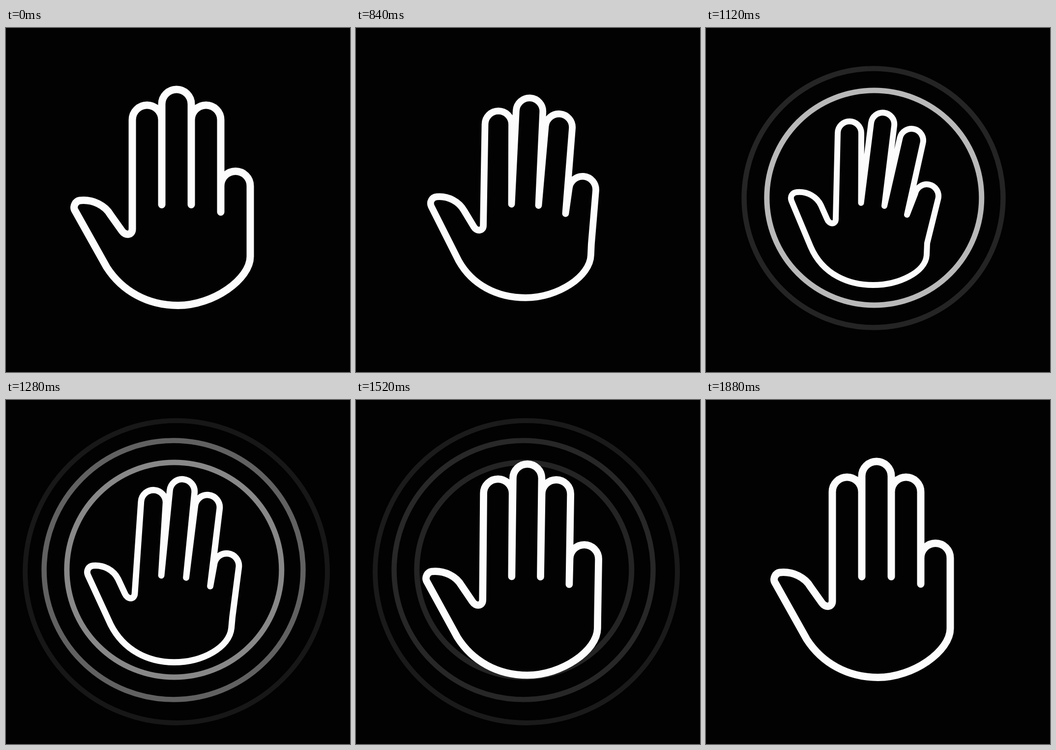
An HTML page without scripts that plays this animation: 700x700 px, repeating every 2.4 s.

```html
<!DOCTYPE html>
<html lang="en">
<head>
<meta charset="utf-8">
<title>Hand press</title>
<style>
  html, body { margin: 0; width: 100%; height: 100%; overflow: hidden; background: #020202; }
  svg { display: block; width: 100%; height: 100%; fill: none; stroke: #fcfcfc; }

  circle { opacity: 0; animation: 2.4s linear infinite; }
  .inner { stroke-width: 11; animation-name: inner; }
  .middle { stroke-width: 10.5; animation-name: middle; }
  .outer { stroke-width: 10; animation-name: outer; }

  @keyframes inner {
    0%, 40% { opacity: 0; }
    46.667% { opacity: .735; }
    48.333% { opacity: .75; }
    53.333% { opacity: .54; }
    63.333% { opacity: .135; }
    68.333%, 100% { opacity: 0; }
  }
  @keyframes middle {
    0%, 45% { opacity: 0; }
    46.667% { opacity: .135; }
    50% { opacity: .47; }
    53.333% { opacity: .385; }
    63.333% { opacity: .15; }
    70%, 100% { opacity: 0; }
  }
  @keyframes outer {
    0%, 51.667% { opacity: 0; }
    53.333% { opacity: .085; }
    56.667% { opacity: .19; }
    63.333% { opacity: .1; }
    70%, 100% { opacity: 0; }
  }

  /* One continuous line: little finger, palm, thumb, index, middle, ring.
     Arcs of radius 1 grow into half circles over their chord. */
  .hand {
    stroke-linejoin: round;
    stroke-linecap: round;
    animation: press 2.4s infinite;
  }
  @keyframes press {
    0%, 26.667%, 68.333%, 100% {
      stroke-width: 15px;
      animation-timing-function: cubic-bezier(.35, 0, .7, .49);
      d: path("M437 374.5 L437 321.5 A1 1 0 0 1 497 321.5 L497 440 L497 465 C497 511 422 564.5 350 564.5 C288 564.5 236 535 205 487 L139.5 370 C136.5 363 141 352.5 150 351 C178 348 202 362 212.5 380 L236 413 C243 423 257 422 257 409 L257 187 A1 1 0 0 1 317 187 L317 359.5 L317 155 A1 1 0 0 1 377 155 L377 359.5 L377 187 A1 1 0 0 1 437 187 L437 374.5");
    }
    35% {
      stroke-width: 13.8px;
      animation-timing-function: cubic-bezier(.3, .42, .65, 1);
      d: path("M426.5 377.5 L433.7 326.5 A1 1 0 0 1 488 331.5 L479 440 L478 462 C477 505 412 549 345 549 C286 549 236 522 209 474 L153 363 C149 354 154.5 344.5 164 343.5 C188 341 210 354 220 372 L240 405 C246 415 259 413 259 402 L262.5 196 A1 1 0 0 1 317 196 L316.5 358.5 L325.8 168 A1 1 0 0 1 380.2 171 L371.5 361 L385.5 199.5 A1 1 0 0 1 440 204.5 L426.5 377.5");
    }
    46.667% {
      stroke-width: 12px;
      animation-timing-function: cubic-bezier(.35, 0, .7, .5);
      d: path("M409 380 L425.7 337 A1 1 0 0 1 472.5 347 L450 438 L449 462 C447 497 392 523 340 523 C292 523 238 503 213 445 L174 352 C170.5 343 175 335 185 334 C207 332 226 344 234 361 L246 388 C251 401 264 400 264 389 L268 214 A1 1 0 0 1 316 214 L315.5 356 L336 193 A1 1 0 0 1 383 199 L363 362 L394.6 223.7 A1 1 0 0 1 441.4 234.3 L409 380");
    }
    53.333% {
      stroke-width: 12.8px;
      animation-timing-function: cubic-bezier(.3, .35, .6, 1);
      d: path("M415.5 379 L423.7 334.7 A1 1 0 0 1 473.7 340.3 L460.5 442 L458.5 464 C455 503 400 533.5 342 533.5 C290 533.5 240 510 213 457 L166.5 356 C163 347 168 338 177 337 C199 335 219 346 228 364 L242 394 C248 407 261 406 262 394 L274.9 206.7 A1 1 0 0 1 325.1 210.3 L316 357 L333.4 184 A1 1 0 0 1 383.6 189 L366.5 361.5 L384.7 215.7 A1 1 0 0 1 434.7 221.3 L415.5 379");
    }
  }
</style>
</head>
<body>
<svg viewBox="0 0 700 700">
  <circle class="outer" cx="346.5" cy="349.5" r="307.5"/>
  <circle class="middle" cx="341" cy="346" r="263.5"/>
  <circle class="inner" cx="342.3" cy="345.5" r="218.5"/>
  <path class="hand"/>
</svg>
</body>
</html>
```
